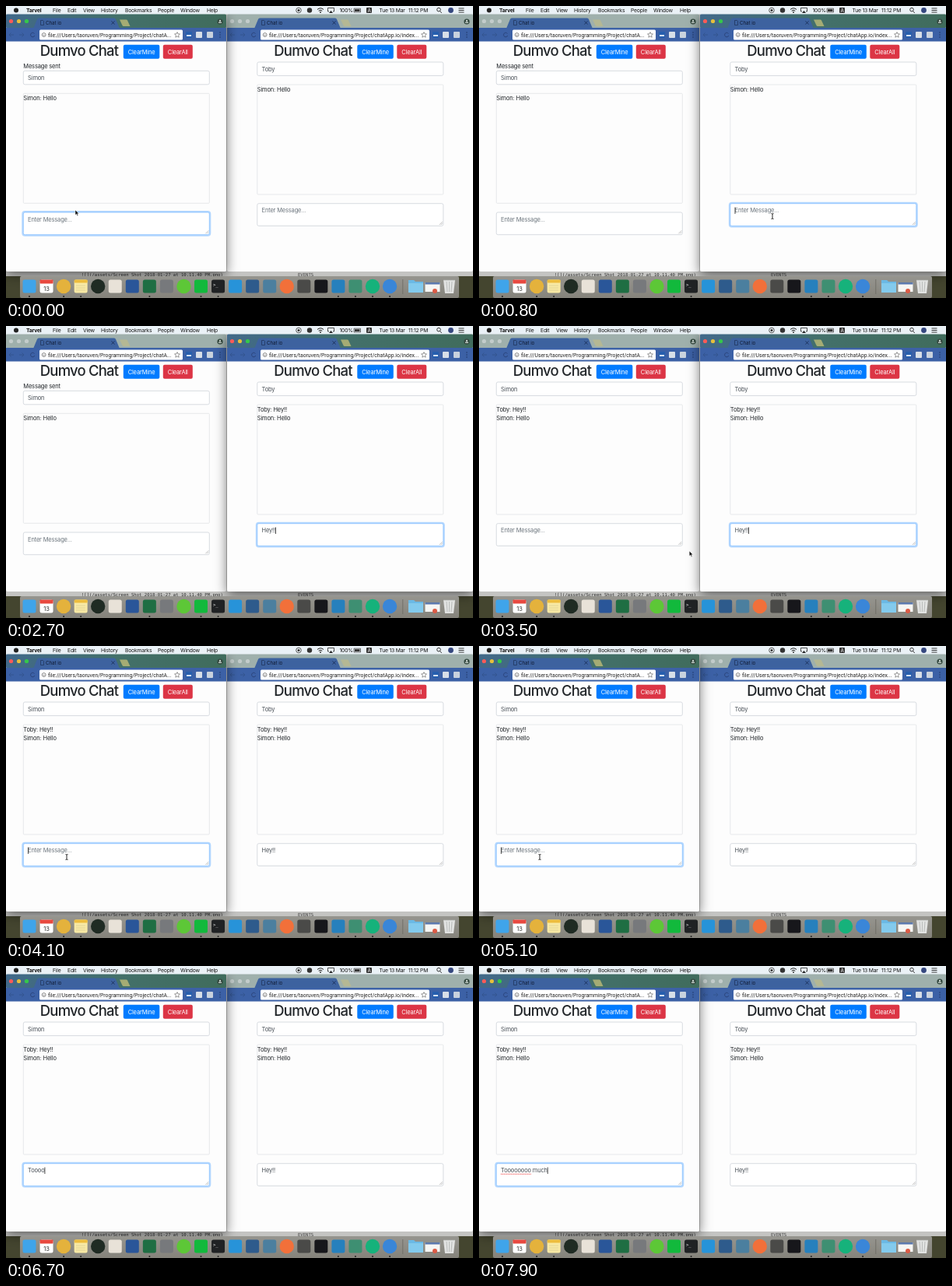
Animation of 600x375 px, one loop 8 s. Source, as an HTML page:

```html
<!DOCTYPE html>
<html>
<head>
<meta charset="utf-8">
<style>
html, body { margin: 0; width: 100%; height: 100%; overflow: hidden; background: #c4c4c2; }
svg { display: block; width: 600px; height: 375px; font-family: Inter, Roboto, sans-serif; }
.body { font-size: 7.5px; letter-spacing: -.17px; }
.menu { font-size: 6.8px; letter-spacing: -.2px; }
.title { font-size: 18.5px; font-weight: 500; letter-spacing: -.8px; }
.url { font: 6.8px Roboto, sans-serif; }
.tab { font-size: 6.3px; letter-spacing: -.1px; }
.mono { font: 5.6px "DejaVu Sans Mono", monospace; }
.mid { text-anchor: middle; }
.bold { font-weight: 700; }
</style>
</head>
<body>
<svg id="stage" viewBox="0 0 600 375">
  <defs>
    <filter id="shade" x="-20%" y="-10%" width="140%" height="125%">
      <feDropShadow dx="0" dy="4" stdDeviation="8" flood-opacity=".55"/>
    </filter>
    <linearGradient id="dock" x1="0" y1="0" x2="0" y2="1">
      <stop offset="0" stop-color="#96958f"/><stop offset="1" stop-color="#85837b"/>
    </linearGradient>
    <linearGradient id="strip">
      <stop offset="0" stop-color="#41698a"/><stop offset=".5" stop-color="#43706a"/>
      <stop offset="1" stop-color="#406c5c"/>
    </linearGradient>
  </defs>
  <g id="desk"></g>
  <g id="windows"></g>
  <g id="bars"></g>
  <g id="pointer"></g>
</svg>
<script>
const LOOP = 8000;
const RIGHT_CLICK = 500, LEFT_CLICK = 4050, SENT = 2650, RECEIVED = 2800;
const A = 'Simon', B = 'Toby';
const el = id => document.getElementById(id);

const rect = (x, y, w, h, fill, more = '') =>
  `<rect x="${x}" y="${y}" width="${w}" height="${h}" fill="${fill}" ${more}/>`;
const dot = (x, y, r, fill) => `<circle cx="${x}" cy="${y}" r="${r}" fill="${fill}"/>`;
const line = (d, stroke, w = 1) =>
  `<path d="${d}" fill="none" stroke="${stroke}" stroke-width="${w}"/>`;
const shape = (d, fill) => `<path d="${d}" fill="${fill}"/>`;
const text = (x, y, s, cls, fill = '#212529', more = '') =>
  `<text x="${x}" y="${y}" class="${cls}" fill="${fill}" ${more}>${s}</text>`;

function desk() {
  return rect(0, 0, 600, 375, '#c4c4c2')
    + rect(0, 347, 600, 28, '#44452f')
    + text(97, 347, '![](/assets/Screen Shot 2018-01-27 at 10.11.40 PM.png)', 'mono', '#333')
    + text(375, 347, 'EVENTS', 'mono', '#444');
}

function menuBar() {
  const items = [[60, 'File'], [79, 'Edit'], [99, 'View'], [122, 'History'], [153, 'Bookmarks'],
    [195, 'People'], [224, 'Window'], [258, 'Help'], [428.5, '100%'], [479.5, 'Tue 13 Mar'], [517, '11:12 PM']];
  return rect(0, 0, 600, 10.5, '#eaf1f6')
    + dot(13, 5.4, 3, '#222')
    + text(26, 8, 'Tarvel', 'menu bold', '#111')
    + items.map(([x, s]) => text(x, 8, s, 'menu', '#111')).join('')
    + line('M372.7 5.5a3.3 3.3 0 1 0 6.6 0a3.3 3.3 0 1 0-6.6 0', '#333', .8) + dot(376, 5.5, 1.5, '#333')
    + dot(390, 5.5, 3.2, '#333')
    + line('M400 4.5q4-3.4 8 0M401.7 6.3q2.3-2 4.6 0', '#222', 1) + dot(404, 8, .9, '#222')
    + line('M415 7h-1.5v-4.5h8v4.5h-1.5', '#222', .8) + shape('M415 9l2.5-3 2.5 3z', '#222')
    + line('M447 3.2h8.5v4.8h-8.5z', '#333', .7) + rect(448, 4.2, 6.5, 2.8, '#333')
    + rect(463, 2, 7, 7, '#333', 'rx="1"') + text(466.5, 7.8, 'A', 'tab mid', '#fff')
    + line('M553.7 4.7a2.3 2.3 0 1 0 4.6 0a2.3 2.3 0 1 0-4.6 0M557.5 6.5l2.3 2.5', '#222', .9)
    + dot(571.5, 5.5, 3.4, '#35477f')
    + line('M581.5 3h7M581.5 5.5h7M581.5 8h7', '#222', .9);
}

function dock() {
  const round = new Set([2, 4, 9, 15, 20, 21]);
  const hues = ['#3fa4ea', '#fff', '#e4b23c', '#f8e9a4', '#1f2b23', '#e8e2d8', '#2a5699', '#1f6e43',
    '#77797c', '#5dc737', '#12b93c', '#202224', '#2793d9', '#2e5b8c', '#4b7f9f', '#f2703a',
    '#4a4a48', '#17171b', '#2680bd', '#3e8f72', '#16b27b', '#3a86d8'];
  const running = [0, 2, 3, 7, 10, 11, 18, 19, 20, 21];
  let s = rect(18, 347, 564, 28, 'url(#dock)', 'rx="2"');
  hues.forEach((c, i) => {
    const x = 30 + i * 22.05;
    s += round.has(i) ? dot(x, 360, 9.2, c) : rect(x - 8.5, 351.5, 17, 17, c, 'rx="2.5"');
  });
  s += rect(43.5, 351.5, 17, 5, '#e8493f', 'rx="1"') + text(52, 366, '13', 'body mid', '#333')
    + rect(87.7, 351.5, 17, 4, '#edbd3e', 'rx="1"')
    + line('M90 359h12M90 362h12M90 365h12', '#d3c892', .6)
    + text(266, 360, '&gt;_', 'mono', '#eee');
  running.forEach(i => s += dot(30 + i * 22.05, 373, 1, '#222'));
  return s
    + rect(509.5, 351, .7, 19, '#65635d')
    + shape('M517 352h7l2 2h10v14h-19z', '#6bb9e5') + rect(517, 356, 19, 12, '#83caed')
    + rect(538.5, 355, 19, 12, '#f6f6f4') + rect(538.5, 355, 19, 2.5, '#5b79ae') + dot(551, 366, 3, '#db5a45')
    + shape('M562 352h15l-2 17h-11z', '#e2e3e2')
    + line('M562 352h15M566 354l1 13M569.5 354v13M573 354l-1 13', '#a9acab', .7);
}

// Browser frame; icons at the right keep their distance to the right edge.
function frame(x, w, active, url) {
  const r = x + w;
  const lights = active ? ['#fc5b57', '#e5bf3c', '#34c84a'] : ['#c3cccb', '#c3cccb', '#c3cccb'];
  return `<g ${active ? 'filter="url(#shade)"' : ''}>` + rect(x, 10, w, 331, '#fdfdfd', 'rx="2"') + '</g>'
    + rect(x, 10, w, 19, active ? 'url(#strip)' : '#9fb0ac', 'rx="2"')
    + lights.map((c, i) => dot(x + 6.5 + i * 10, 19.5, 2.6, c)).join('')
    + shape(`M${x + 146} 17.5h8.5q1 0 1.5 1l3.500 7.5h-8.500q-1 0-1.500-1z`, active ? '#a5ac74' : '#b5b894')
    + shape(`M${x + 35} 29l5-12q.5-1.5 2-1.5h97q1.5 0 2 1.5l5 12z`, '#3d629f')
    + line(`M${x + 44.5} 18.5h3l1 1v5h-4z`, '#1d3157', .7)
    + text(x + 51, 24, 'Chat io', 'tab', '#101b33')
    + line(`M${x + 135.5} 19.5l4 4m0-4l-4 4`, '#15264d', .8)
    + dot(r - 8, 20, 3.6, '#33483f') + dot(r - 8, 19, 1.2, '#c5d0ca') + rect(r - 10, 20.6, 4, 1.4, '#c5d0ca')
    + rect(x, 28, w, 17.5, '#3c61a6')
    + line(`M${x + 10} 37h-6m2.5-2.5l-2.5 2.5l2.5 2.5M${x + 17} 37h6m-2.5-2.5l2.5 2.5l-2.5 2.5`, '#33548f')
    + line(`M${x + 36.5} 35.5a2.7 2.7 0 1 0 .3 2.5`, '#2b447b')
    + rect(x + 43, 30.5, w - 99, 13, '#fff', 'rx="1.5"')
    + line(`M${x + 46.3} 37a2.4 2.4 0 1 0 4.8 0a2.4 2.4 0 1 0-4.8 0M${x + 48.7} 36.5v2`, '#555', .7)
    + text(x + 54, 39.5, url, 'url', '#222')
    + line(`M${r - 63} 33.5l1 2.3 2.5.2-1.9 1.7.6 2.5-2.2-1.300-2.200 1.300.6-2.500-1.900-1.700 2.500-.2z`, '#555', .6)
    + rect(r - 52, 33, 8, 8, '#275fae', 'rx="1"') + rect(r - 51, 37, 6, 2, '#d8e4f5')
    + rect(r - 39, 33, 8, 8, '#d8dfe8', 'rx="1"') + rect(r - 25, 33, 8, 8, '#c9d2de', 'rx="1"')
    + [34, 37, 40].map(y => dot(r - 8, y, .8, '#24396b')).join('');
}

function field(x, y, w, h, focus) {
  const ring = focus ? rect(x - 1, y - 1, w + 2, h + 2, 'none', 'rx="3" stroke="#b5d8ff" stroke-width="2"') : '';
  return ring + rect(x, y, w, h, '#fff', `rx="2" stroke="${focus ? '#80bdff' : '#ced4da'}" stroke-width=".8"`);
}

function page(x, p) {
  const dy = p.status ? 11.3 : 0, w = 239;
  const button = (bx, bw, fill, s) => rect(x + bx, 49.7, bw, 18, fill, 'rx="2"')
    + text(x + bx + bw / 2, 61.5, s, 'body mid', '#fff');
  return text(x + 21.5, 64, 'Dumvo Chat', 'title')
    + button(128.5, 46.5, '#007bff', 'ClearMine') + button(179.5, 38, '#dc3545', 'ClearAll')
    + (p.status ? text(x, 80, p.status, 'body') : '')
    + field(x, 72 + dy, w, 17.5, false) + text(x + 5.8, 83.5 + dy, p.name, 'body', '#495057')
    + rect(x, 101 + dy, w, 141, '#fdfdfd', 'stroke="#e1e4e6" stroke-width=".8" rx="1"')
    + p.log.map((m, i) => text(x, 109.7 + dy + i * 11.4, m, 'body')).join('')
    + field(x, 253.7 + dy, w, 28.7, p.focus)
    + line(`M${x + w - 5} ${281 + dy}l4-4m-2 4l2-2`, '#888', .5)
    + text(x + 5.8, 265.2 + dy, p.draft || 'Enter Message...', 'body', p.draft ? '#495057' : '#6c757d',
        p.focus ? 'id="draft"' : '');
}

const typed = (s, t, from, step) => s.slice(0, Math.max(0, Math.floor((t - from) / step)));

function state(t) {
  const rightOn = t >= RIGHT_CLICK && t < LEFT_CLICK;
  const hello = `${A}: Hello`, hey = `${B}: Hey!!`;
  return {
    rightOn,
    left: { name: A, focus: !rightOn, status: t < RECEIVED ? 'Message sent' : '',
      log: t < RECEIVED ? [hello] : [hey, hello], draft: typed('Toooooooo much', t, 6000, 135) },
    right: { name: B, focus: rightOn, log: t < SENT ? [hello] : [hey, hello],
      draft: typed('Hey!!', t, 1650, 165) }
  };
}

// The caret stays on while typing and blinks from the last click or key.
function caretOn(t) {
  if (t >= 6000 || (t >= 1700 && t < 2475)) return true;
  const last = t >= LEFT_CLICK ? LEFT_CLICK : t >= 2475 ? 2475 : t >= RIGHT_CLICK ? RIGHT_CLICK : -500;
  return (t - last) % 1000 < 500;
}

function caret(t, { rightOn, left, right }) {
  const p = rightOn ? right : left, x = rightOn ? 328.6 : 28.1;
  const y = p.status ? 276.5 : 265.2;
  const width = s => s ? el('draft').getSubStringLength(0, s.length) : 0;
  let s = '';
  if (p.draft.includes(' ')) {
    s += `<path d="M${x} ${y + 2}h${width(p.draft.split(' ')[0])}" stroke="#e33" stroke-dasharray="1 .8"/>`;
  }
  if (caretOn(t)) s += rect(x + width(p.draft), y - 6.7, .8, 8.5, '#222');
  return s;
}

const easeIn = u => u * u, easeOut = u => u * (2 - u), easeBoth = u => u * u * (3 - 2 * u);

function glide(t, t0, t1, a, b, ease) {
  const e = ease(Math.min(1, Math.max(0, (t - t0) / (t1 - t0))));
  return a.map((v, i) => v + (b[i] - v) * e);
}

function pointer(t) {
  if ((t >= 1800 && t < 3200) || t >= 6100) return '';
  const start = [89, 262], rightField = [377, 270], edge = [271, 289], leftField = [78, 271];
  const [x, y] = t < 1800 ? glide(t, 0, 450, start, rightField, easeBoth)
    : t < 3500 ? glide(t, 3200, 3500, rightField, edge, easeIn)
    : glide(t, 3500, 4000, edge, leftField, easeOut);
  const overField = y > 254 && y < 283 && (x > 323 || (x < 261 && t > 3500));
  return `<g transform="translate(${x} ${y})">` + (overField
    ? line('M-1.5-3.5q1.5 0 1.5 1v5q0 1-1.5 1M1.5-3.5q-1.5 0-1.5 1M1.5 3.5q-1.5 0-1.5-1', '#111', .9)
    : '<path d="M0 0v6.5l1.5-1.4 1.1 2.5 1.1-.5-1.1-2.4h2z" fill="#000" stroke="#fff" stroke-width=".5"/>') + '</g>';
}

const path = 'file:///Users/taoruven/Programming/Project/';
let shown = '';

function draw() {
  const t = performance.now() % LOOP, s = state(t), key = JSON.stringify(s);
  if (key !== shown) {
    const left = frame(0, 283, !s.rightOn, path + 'chatA...') + page(22.3, s.left);
    const right = frame(284, 316, s.rightOn, path + 'chatApp.io/index...') + page(322.8, s.right);
    el('windows').innerHTML = s.rightOn ? left + right : right + left;
    shown = key;
  }
  el('pointer').innerHTML = caret(t, s) + pointer(t);
  requestAnimationFrame(draw);
}

el('desk').innerHTML = desk();
el('bars').innerHTML = menuBar() + dock();
draw();
</script>
</body>
</html>
```
